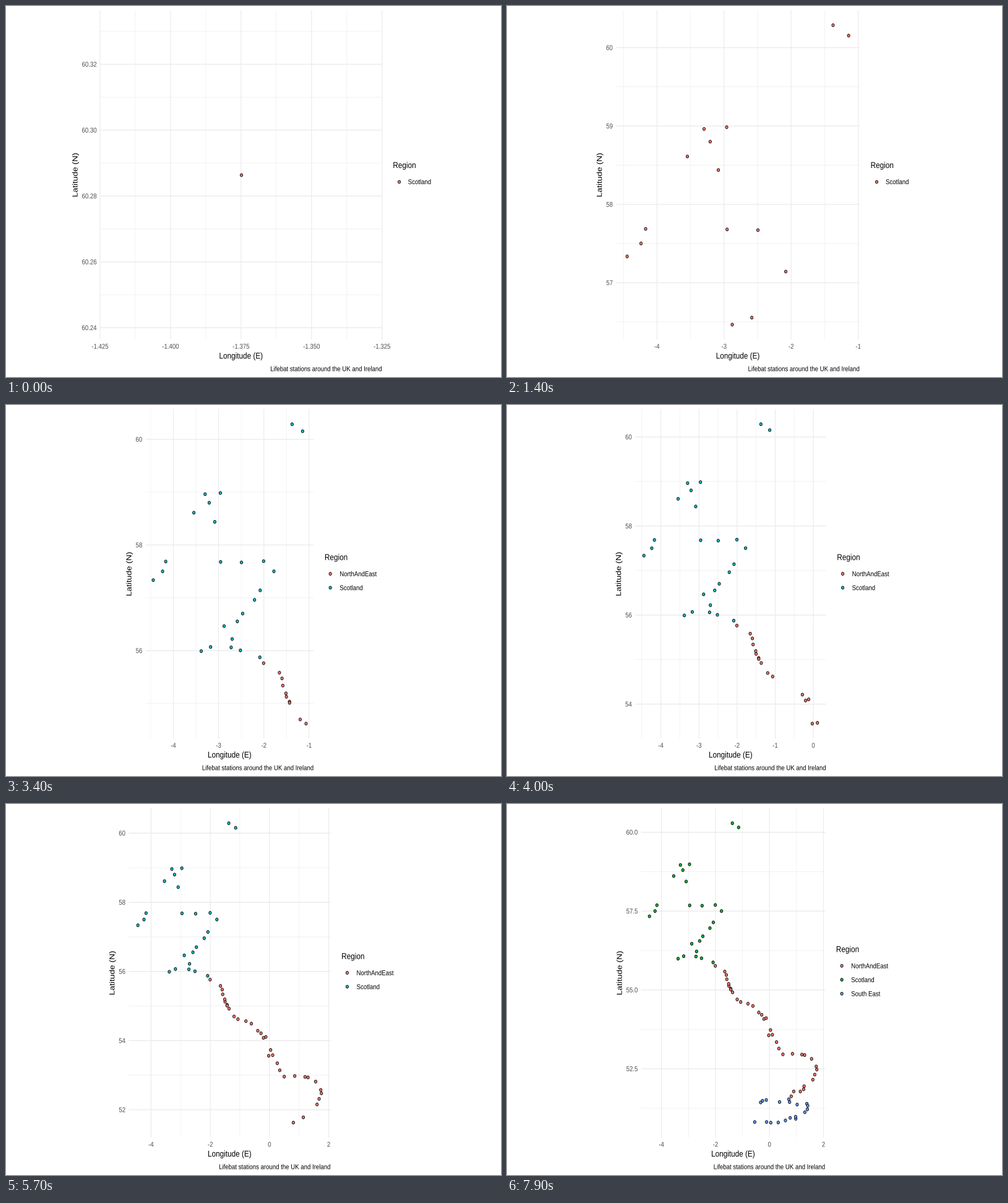
A matplotlib script that plays this animation: 800 by 600 pixels, repeating every 8 s.

```python
import math

import numpy as np
import matplotlib.pyplot as plt
from matplotlib.animation import FuncAnimation
from matplotlib.collections import EllipseCollection, LineCollection
from matplotlib.patches import PathPatch
from matplotlib.textpath import TextPath
from matplotlib.transforms import Affine2D

# Layout units: a 748 x 480 sheet shown on an 800 x 600 stage.
W, H = 748, 480
BOTTOM, TOP = 48.4, 474.5
MARGIN, TITLE_H, KEY, PITCH = 5.48, 11.5, 17.28, 18
SMALL, BIG = 9, 11
FONT = {"family": "Liberation Sans"}
GRID, GREY = "#EBEBEB", "#4D4D4D"
CAPTION = "Lifebat stations around the UK and Ireland"
NAMES = ["NorthAndEast", "Scotland", "South East"]
HUES = {
    1: ["#F8766D"],
    2: ["#F8766D", "#00BFC4"],
    3: ["#F8766D", "#00BA38", "#619CFF"],
}

# (longitude, latitude) in order of appearance
SCOTLAND = [
    (-1.375, 60.2864), (-2.961, 58.985), (-1.143, 60.154), (-3.207, 58.8),
    (-3.298, 58.962), (-3.547, 58.611), (-3.085, 58.438), (-2.955, 57.68),
    (-4.169, 57.687), (-4.238, 57.501), (-4.445, 57.335), (-2.495, 57.671),
    (-2.08, 57.142), (-2.586, 56.554), (-2.878, 56.465), (-2.005, 57.694),
    (-2.468, 56.702), (-1.777, 57.502), (-2.205, 56.961), (-2.7, 56.221),
    (-2.517, 56.005), (-2.088, 55.874), (-3.176, 56.07), (-2.722, 56.061),
    (-3.384, 55.991),
]
NORTH_EAST = [
    (-1.58, 55.339), (-2.005, 55.763), (-1.501, 55.127), (-1.598, 55.475),
    (-1.433, 55.036), (-1.196, 54.698), (-1.511, 55.192), (-1.066, 54.619),
    (-1.655, 55.583), (-1.431, 55.012), (-1.365, 54.923), (-0.203, 54.079),
    (-0.287, 54.212), (-0.122, 54.106), (-0.027, 53.561), (0.108, 53.579),
    (-0.395, 54.286), (-0.796, 54.563), (-0.613, 54.491), (0.039, 53.729),
    (0.498, 52.958), (0.262, 53.346), (1.201, 52.95), (0.347, 53.142),
    (0.853, 52.976), (1.302, 52.935), (1.732, 52.574), (1.559, 52.815),
    (1.754, 52.475), (1.676, 52.316), (1.606, 52.154), (0.806, 51.628),
    (1.143, 51.78), (1.283, 51.946), (1.265, 51.85), (0.898, 51.782),
]
SOUTH_EAST = [
    (-0.257, 51.484), (0.373, 51.447), (-0.327, 51.433), (-0.119, 51.51),
    (1.385, 51.392), (1.417, 51.33), (0.744, 51.445), (0.717, 51.535),
    (1.025, 51.365), (1.31, 51.122), (1.402, 51.214), (0.975, 50.915),
    (0.968, 50.979), (-0.107, 50.813), (0.325, 50.797), (0.591, 50.861),
    (-0.546, 50.812), (0.048, 50.793), (0.767, 50.944),
]
POINTS = np.array(SCOTLAND + NORTH_EAST + SOUTH_EAST)
REGION = np.repeat([1, 0, 2], [len(SCOTLAND), len(NORTH_EAST), len(SOUTH_EAST)])

fig = plt.figure(figsize=(8, 6), dpi=100, facecolor="white")
ax = fig.add_axes([0, 0, 1, 1])
ax.set_axis_off()
ax.set(xlim=(0, W), ylim=(0, H))
live = []
glyphs = {}


def limits(v):
    """Data range widened by 5 %, or a fixed window for one value."""
    lo, hi = float(v.min()), float(v.max())
    pad = 0.05 * (hi - lo) if hi > lo else 0.05
    return lo - pad, hi + pad


def nice_step(lo, hi, m=5):
    """Best tick step by simplicity, coverage and density."""
    span = hi - lo
    z0 = math.floor(math.log10(span))
    best, pick = -9, 1
    for i, q in enumerate((1, 5, 2, 2.5, 4, 3)):
        for z in range(z0 - 2, z0 + 1):
            step = q * 10.0 ** z
            if not span / 12 < step < span:
                continue
            base = math.floor(lo / step)
            last = math.floor(hi / step)
            for first in range(base, base + 3):
                for end in range(max(first + 1, last - 1), last + 2):
                    a, b = first * step, end * step
                    simple = -i / 5 + (a <= 0 <= b)
                    cover = 1 - 0.5 * ((hi - b) ** 2 + (lo - a) ** 2) / (0.1 * span) ** 2
                    r = (max(b, hi) - min(a, lo)) / step / (m - 1)
                    dense = 2 - max(r, 1 / r)
                    score = 0.25 * cover + 0.2 * simple + 0.5 * dense
                    if score > best + 1e-9:
                        best, pick = score, step
    return pick


def ticks(lo, hi):
    """Major ticks, minor ticks and labels inside the limits."""
    step = nice_step(lo, hi)
    n = range(math.floor(lo / step) - 1, math.ceil(hi / step) + 2)
    major = [k * step for k in n if lo <= k * step <= hi]
    minor = [(k + 0.5) * step for k in n if lo <= (k + 0.5) * step <= hi]
    places = next(d for d in range(6) if all(abs(v - round(v, d)) < 1e-8 for v in major))
    return major, minor, [f"{v:.{places}f}" for v in major]


def outline(s, size):
    if (s, size) not in glyphs:
        path = TextPath((0, 0), s, size=size, prop=FONT)
        box = path.get_extents()
        glyphs[s, size] = path, box.x0 + box.x1
    return glyphs[s, size]


def add(artist):
    live.append(ax.add_artist(artist))


def text(x, y, s, size, color="black", align=0.0, angle=0):
    path, width = outline(s, size)
    place = Affine2D().translate(-align * width, 0).rotate_deg(angle).translate(x, y)
    add(PathPatch(path, fc=color, lw=0, transform=place + ax.transData))


def dots(xy, colors):
    add(EllipseCollection(
        [3.91], [3.91], [0], units="xy", offsets=xy, offset_transform=ax.transData,
        facecolors=colors, edgecolors="black", linewidths=0.6, zorder=5))


def draw(i):
    while live:
        live.pop().remove()

    pts, reg = POINTS[:i + 1], REGION[:i + 1].tolist()
    shown = sorted(set(reg))
    hue = dict(zip(shown, HUES[len(shown)]))

    (x0, x1), (y0, y1) = limits(pts[:, 0]), limits(pts[:, 1])
    xmaj, xmin, xlab = ticks(x0, x1)
    ymaj, ymin, ylab = ticks(y0, y1)

    # The panel keeps its height; everything is centred across the sheet.
    scale = (TOP - BOTTOM) / (y1 - y0)
    width = (x1 - x0) * scale
    before = 2.74 + 4.95 + TITLE_H + MARGIN + max(outline(s, SMALL)[1] for s in ylab)
    names = max(outline(NAMES[r], SMALL)[1] for r in shown)
    after = 6 * MARGIN + KEY + names
    edge = (W - before - width - after) / 2
    left = edge + before
    right = left + width
    px = lambda v: left + (v - x0) * scale
    py = lambda v: BOTTOM + (v - y0) * scale

    lines, weights = [], []
    for xs, ys, lw in ((xmin, ymin, 0.45), (xmaj, ymaj, 0.9)):
        lines += [[(left, py(v)), (right, py(v))] for v in ys]
        lines += [[(px(v), BOTTOM), (px(v), TOP)] for v in xs]
        weights += [lw * 1.07] * len(ys) + [lw * 0.92] * len(xs)
    add(LineCollection(lines, linewidths=weights, colors=GRID, snap=False, zorder=0))

    for v, s in zip(xmaj, xlab):
        text(px(v), 36.6, s, SMALL, GREY, 0.5)
    for v, s in zip(ymaj, ylab):
        text(left - 4.95, py(v) - 3.1, s, SMALL, GREY, 1)

    text((left + right) / 2, 23.8, "Longitude (E)", BIG, align=0.5)
    text(edge + MARGIN + 7.8, (BOTTOM + TOP) / 2, "Latitude (N)", BIG, align=0.5, angle=90)
    text(right, 7.6, CAPTION, SMALL, align=1)

    dots(np.column_stack([px(pts[:, 0]), py(pts[:, 1])]), [hue[r] for r in reg])

    lx = right + 3 * MARGIN
    lift = PITCH / 2 * (len(shown) - 1)
    text(lx, 270.4 + lift, "Region", BIG)
    keys = [252.6 + lift - PITCH * k for k in range(len(shown))]
    for r, y in zip(shown, keys):
        text(lx + KEY + MARGIN, y - 3.1, NAMES[r], SMALL)
    dots([(lx + KEY / 2, y) for y in keys], [hue[r] for r in shown])
    return []


anim = FuncAnimation(fig, draw, frames=len(POINTS), interval=100,
                     init_func=lambda: draw(0), repeat=True, repeat_delay=0)
plt.show()
```
